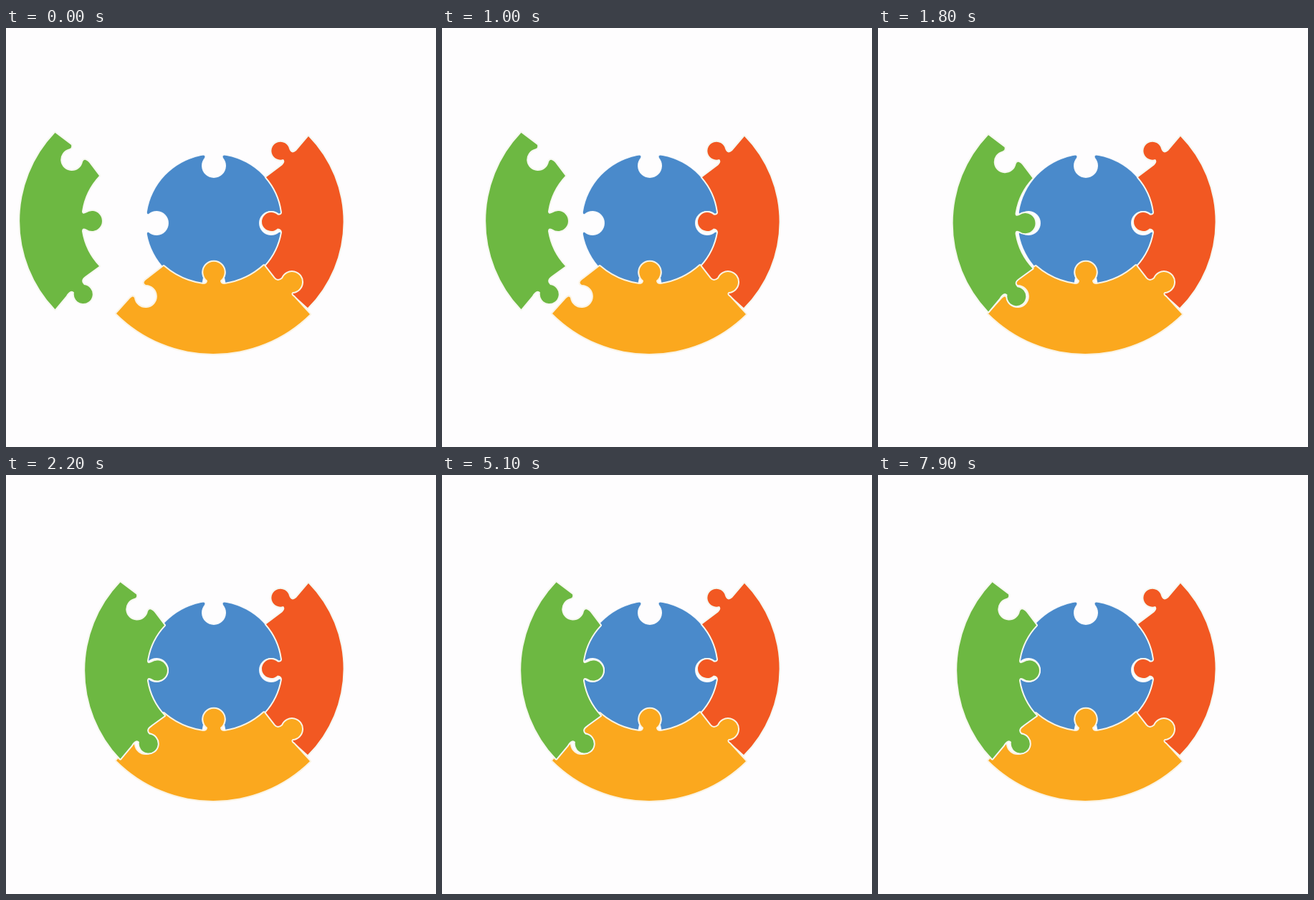
Recreate the animation shown at these times as an HTML page. Size 600 by 584 pixels, loop 8000 ms.

```html
<!DOCTYPE html>
<html lang="en">
<head>
<meta charset="utf-8">
<title>Round puzzle</title>
<style>
  html, body { margin: 0; width: 100%; height: 100%; overflow: hidden; background: #fefdfe; }
  svg { display: block; width: 100%; height: 100%; }
  path { stroke: #f6f8f0; stroke-width: 4; stroke-linejoin: round; paint-order: stroke; }
  #core { fill: #4a8acb; stroke: #f1f6fb; stroke-width: 2; }
  #right { fill: #f25822; }
  #bottom { fill: #fba81e; stroke: #fbf3e2; }
  #left { fill: #6db842; }
</style>
</head>
<body>
<svg viewBox="0 0 600 584">
  <path id="core" d="M196.8 257 A94.5 94.5 0 0 1 272 178 Q279 176 277 181
    A17 17 0 1 0 303 181 Q301 176 308 178 A94.5 94.5 0 0 1 384 256
    Q384 260 381 259 A17 17 0 1 0 381 285 Q384 284 384 287
    A94.5 94.5 0 0 1 308 363 L305 348 A16.5 16.5 0 1 0 275 348 L272 363
    A94.5 94.5 0 0 1 196.8 287 Q197 284 199 285 A17 17 0 1 0 199 259 Q197 260 196.8 257Z"/>
  <path id="right" d="M422 151 A170 170 0 0 1 421 390 L400 371 L380 358 L362 332
    A93 93 0 0 0 385 285 Q385 280 379 279.4 A13 13 0 1 1 379 260.6 Q385 261 385 257
    A93 93 0 0 0 363 208 L383 193 Q391 187 387 183
    A12.5 12.5 0 1 1 395 168 Q398 177 405 171Z"/>
  <path id="bottom" d="M154 398 A192 192 0 0 0 424 399 L402 375 Q396 371 400 368
    A14 14 0 1 0 386 349 Q379 355 374 349 L360 331
    A106 106 0 0 1 305 357 Q299 357 299 352 A14.7 14.7 0 1 0 281 352
    Q281 357 275 357 A106 106 0 0 1 220 332 L198 349 Q189 355 195 358
    A16 16 0 1 1 179 376 Q177 372 172 378Z"/>
  <path id="left" d="M159.5 149.5 L182 166.5 Q183 171 179 172 A15.5 15.5 0 1 0 198 190
    Q200 184 207 191 L221 209.5 A92 92 0 0 0 197 259 Q197 264 203 261
    A14 14 0 1 1 203 284 Q197 281 197 287 A92 92 0 0 0 221 335.5
    L203 348.5 Q193 355 200 361.6 A13 13 0 1 1 186 372
    Q181 367 175 377 L159.5 395.5 A178 178 0 0 1 159.5 149.5Z"/>
</svg>
<script>
  const LOOP = 8000, TICK = 100;
  const piece = document.getElementById('left');
  const part = (t, from, to) => Math.min(1, Math.max(0, (t - from) / (to - from)));

  // Speeds up, glides, then settles into its slot.
  function offset(t) {
    const start = part(t, 0, 1000), glide = part(t, 1000, 1400), rest = 1 - part(t, 1400, 2200);
    return {
      x: -91 + 42 * start * start + 27 * glide + 22 * (1 - rest * rest),
      y: -3.5 + 2 * glide + 1.5 * (1 - rest * rest)
    };
  }

  function draw(now) {
    const t = Math.floor((now % LOOP) / TICK) * TICK;
    const { x, y } = offset(t);
    piece.setAttribute('transform', `translate(${x} ${y})`);
    requestAnimationFrame(draw);
  }
  draw(0);
</script>
</body>
</html>
```
